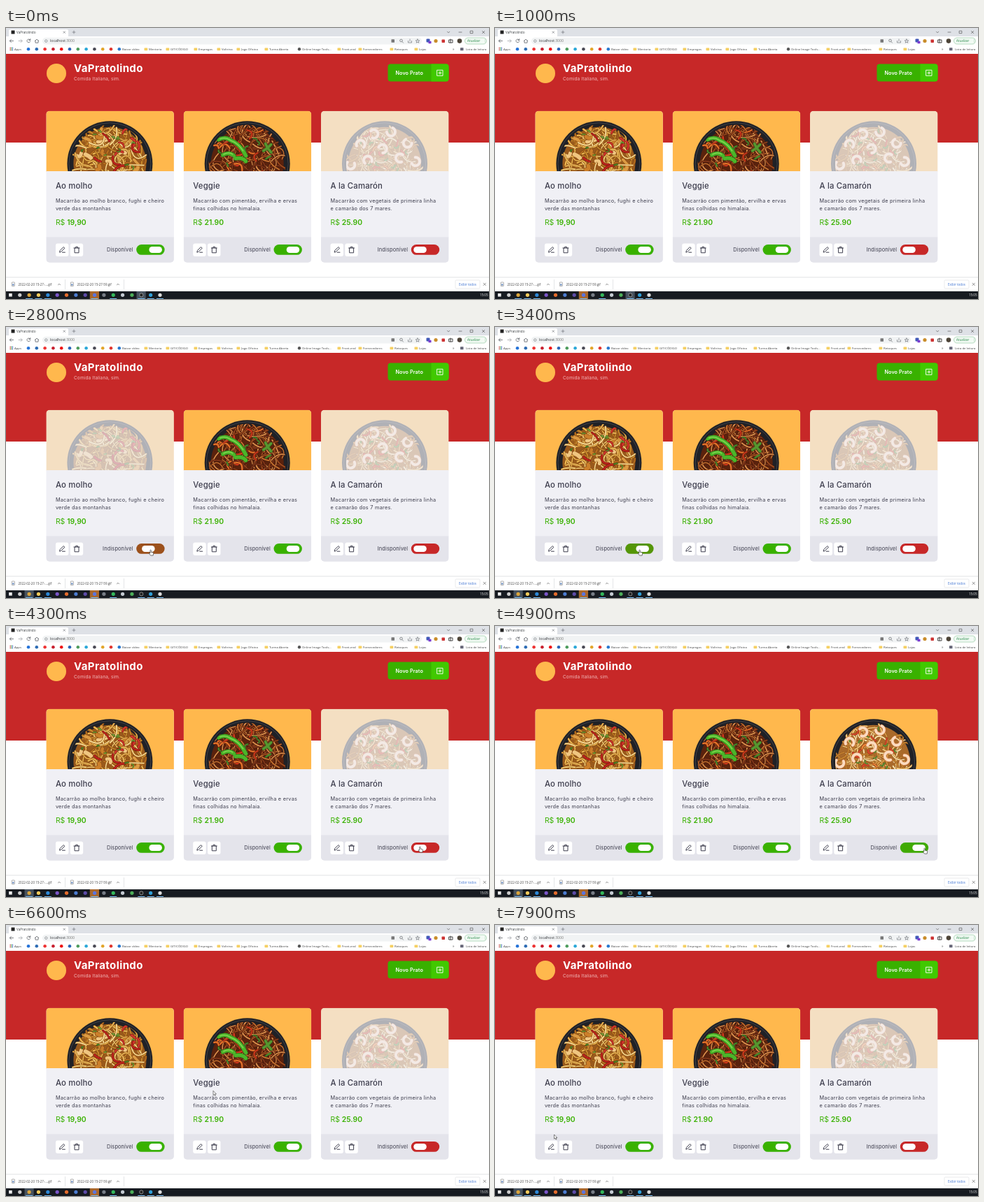
These frames come from a looping animation (690x388 px, 8000 ms). An HTML page:

```html
<!DOCTYPE html>
<html lang="pt-BR">
<head>
<meta charset="utf-8">
<title>VaPratolindo</title>
<style>
  html, body { margin: 0; width: 100%; height: 100%; overflow: hidden; background: #fff; }
  svg { display: block; width: 100%; height: 100%; font-family: Inter, "Open Sans", sans-serif; }
  .ui { font-family: "Open Sans", Roboto, sans-serif; }
</style>
</head>
<body>
<svg id="stage" viewBox="0 0 690 388"></svg>
<script>
const LOOP = 8000, STEP = 100;
const GREEN = [57, 177, 0], RED = [199, 40, 40];

// --- drawing helpers ---
const rect = (x, y, w, h, fill, r = 0, more = '') =>
  `<rect x="${x}" y="${y}" width="${w}" height="${h}" rx="${r}" fill="${fill}" ${more}/>`;
const dot = (x, y, r, fill, more = '') => `<circle cx="${x}" cy="${y}" r="${r}" fill="${fill}" ${more}/>`;
const line = (d, color, w = 1, more = '') =>
  `<path d="${d}" fill="none" stroke="${color}" stroke-width="${w}" stroke-linecap="round" stroke-linejoin="round" ${more}/>`;
const text = (x, y, size, fill, str, more = '') =>
  `<text x="${x}" y="${y}" font-size="${size}" fill="${fill}" ${more}>${str}</text>`;

// --- browser window ---
function browserTop() {
  const ink = '#5f6368';
  let s = rect(0, 0, 690, 12.5, '#dee1e6') + rect(4, 2, 85, 11, '#fff', 2) + rect(0, 12, 690, 25, '#fff');
  s += rect(7.5, 3.5, 5, 5, '#222') + text(15, 7.8, 4.6, '#3c4043', 'VaPratolindo');
  s += line('M82 4.8l2.6 2.6m0-2.6l-2.6 2.6M95 6h4m-2-2v4', ink, .6);
  s += line('M630.5 5.2l1.6 1.6l1.6-1.6M647 6h4M663.5 4.2h3.4v3.4h-3.4zM680.5 4.4l3.2 3.2m0-3.2l-3.2 3.2', '#444', .6);
  s += line('M10.5 18.5h-5m2-2.2l-2.2 2.2l2.2 2.2', ink, .8);
  s += line('M18 18.5h5m-2-2.2l2.2 2.2l-2.2 2.2', '#a5a8ac', .8);
  s += line('M34.5 17.2a2.4 2.4 0 1 0 .2 2M34.8 15.6v1.9h-1.9', ink, .8);
  s += line('M41.2 18.6l2.8-2.5l2.8 2.5m-4.8-.4v3h4v-3', ink, .8);
  s += rect(52, 13.8, 542, 9.6, '#f1f3f4', 4.8) + dot(57.3, 18.6, 1.7, 'none', `stroke="${ink}" stroke-width=".6"`);
  s += text(63, 20.4, 5.2, '#303236', 'localhost<tspan fill="#777">:3000</tspan>');
  s += rect(550.5, 16.3, 4.5, 4.5, '#777', .5);
  s += dot(564.5, 18, 1.8, 'none', `stroke="${ink}" stroke-width=".7"`) + line('M566 19.6l1.5 1.6', ink, .7);
  s += line('M574.5 18.5v2.5h5v-2.5m-2.5-2.5v3M588 16l.8 1.8l2 .1l-1.6 1.3l.6 2l-1.8-1.1l-1.8 1.1l.6-2l-1.6-1.3l2-.1z', ink, .6);
  s += rect(600.5, 15.5, 5, 5, '#4059b8', 1) + rect(603.5, 18.8, 4, 3.5, '#7a3bd0', .6);
  s += dot(614, 18.5, 2.6, '#c98d2b') + rect(622.5, 16.5, 4.5, 4.5, '#c33', .8);
  s += line('M635 16v5m-2-4h5v4h-5z', '#333', .9) + dot(648, 18.6, 3.3, '#4d4438');
  s += rect(655.5, 14, 31, 9, '#f2faf4', 4.5, 'stroke="#86c398" stroke-width=".6"');
  s += text(659, 20.1, 4.5, '#2b8a4b', 'Atualizar') + text(682, 20, 5, '#2b8a4b', '⋮');
  return s + bookmarks();
}

function bookmarks() {
  let s = '';
  for (let i = 0; i < 9; i++)
    s += rect(5.5 + i % 3 * 1.7, 27.8 + (i / 3 | 0) * 1.7, 1.2, 1.2, ['#d44', '#4a4', '#46c'][i % 3]);
  s += text(12, 31.8, 4.3, '#444', 'Apps');
  ['#2472d8', '#2d6cb4', '#e33', '#c8202f', '#e11', '#2a65b8', '#4d9c5d', '#2aa8d8', '#4a4a55', '#e2a52a', '#e0362e', '#2878d0']
    .forEach((c, i) => s += dot(32 + i * 11.8, 30.3, 2.3, c));
  const labels = [[166, 'Baixar vídeo'], [204, 'Mentoria', 1], [235, 'GIT/CÓDIGO', 1], [275, 'Empregos', 1],
    [308, 'Voltrina', 1], [336, 'Jogo Oficina', 1], [376, 'Turma Aberta', 1], [423, 'Online Image Tools...'],
    [480, 'Front-end', 1], [510, 'Fornecedores', 1], [555, 'Retoques', 1], [590, 'Lojas', 1]];
  for (const [x, str, folder] of labels) {
    if (folder) s += rect(x - 6.5, 28.4, 4.8, 3.8, '#f5cf62', .6);
    s += text(x, 31.8, 4.3, '#444', str);
  }
  s += dot(419, 30.3, 2.2, '#555');
  return s + text(638, 31.8, 5, '#555', '»') + rect(649, 28.3, 4.5, 4, '#667', .5) + text(657, 31.8, 4.3, '#444', 'Lista de leitura');
}

function bottomBars() {
  let s = rect(0, 357, 690, 20.5, '#fff') + rect(0, 356.6, 690, .7, '#d4d6d9');
  [[8, '2022-02-20 15-27-....gif', 76], [92, '2022-02-20 15-27-59.gif', 160]].forEach(([x, name, up]) => {
    s += rect(x + .3, 364, 4, 5.6, '#fff', .5, 'stroke="#777" stroke-width=".6"') + rect(x + 1.2, 366.5, 2.2, 2, '#5b82bd');
    s += text(x + 9.5, 368.9, 4.5, '#444', name);
    s += line(`M${up - 1.5} 367.8l1.5-1.5l1.5 1.5`, '#555', .7) + rect(up + 8, 360, .6, 14, '#d2d4d7');
  });
  s += rect(642, 361, 35, 12, '#fff', 1.5, 'stroke="#dadce0" stroke-width=".6"');
  s += text(659.5, 368.6, 4.5, '#3a70d0', 'Exibir todos', 'text-anchor="middle"');
  s += line('M682 365.2l3.4 3.4m0-3.4l-3.4 3.4', '#666', .7);
  s += rect(0, 377, 690, 11, '#171b21');
  s += rect(26.5, 377, 13.2, 11, '#46515d', 0, 'id="browserTask"') + rect(186.5, 377, 13.2, 11, '#46515d', 0, 'id="recorderTask"');
  s += rect(119.8, 377, 13.2, 11, '#a9672c');
  ['#eee', '#ccc', '#dba53a', '#f3cb5b', '#2c88d8', '#7a55c8', '#e36b2c', '#4c7cd0', '#5d4ba8', '#5b74df',
    '#777d86', '#33b85a', '#c5cbd3', '#4cae58', '#222', '#2f9fd8', '#ddd'].forEach((c, i) => {
    const x = 6.4 + i * 13.35;
    s += i ? dot(x, 382.3, 2.6, c, i === 14 ? 'stroke="#ccc" stroke-width=".6"' : '') : rect(x - 2.3, 380, 4.6, 4.6, c);
    if ([2, 3, 4, 9, 11, 14, 15, 16].includes(i)) s += rect(x - 5, 387, 10, 1, '#76b9ed');
  });
  return s + text(677, 384, 4.5, '#eee', '15:05');
}

// --- page ---
function header() {
  let s = rect(0, 37, 690, 127, '#c72828') + dot(72, 65, 14, '#ffb84d');
  s += text(97, 63.3, 15, '#fff', 'VaPratolindo', 'font-weight="700" letter-spacing=".4"');
  s += text(97, 75.2, 6.5, '#f0b9b9', 'Comida Italiana, sim.', 'letter-spacing=".12"');
  s += rect(545.5, 51.6, 87, 25, '#39b100', 4) + `<path d="M607.5 51.6h21a4 4 0 0 1 4 4v17a4 4 0 0 1-4 4h-21z" fill="#41c900"/>`;
  s += text(556.5, 66.8, 7.2, '#fff', 'Novo Prato', 'font-weight="600" letter-spacing=".1"');
  return s + line('M616 60.3h8v8h-8zM620 62.3v4m-2-2h4', '#fff', .9);
}

let seed = 7;
const random = () => (seed = seed * 16807 % 2147483647) / 2147483647;
const between = (a, b) => a + (b - a) * random();
const shaded = (d, color, shade, w) => line(d, shade, w + 1) + line(d, color, w);

// Scatters curved strands with dark edges over the pan.
function strew(count, colors, shade, width, length) {
  let s = '';
  for (let i = 0; i < count; i++) {
    const a = between(0, 6.283), r = 51 * Math.sqrt(random()), dir = between(0, 6.283), len = between(length / 2, length);
    const dx = Math.cos(dir) * len, dy = Math.sin(dir) * len, bend = between(-.9, .9);
    const x = 91 + r * Math.cos(a) - dx / 2, y = 74 + r * Math.sin(a) - dy / 2;
    const mid = [dx / 2 - dy * bend, dy / 2 + dx * bend].map(v => v.toFixed(1));
    s += shaded(`M${x.toFixed(1)} ${y.toFixed(1)}q${mid} ${dx.toFixed(1)} ${dy.toFixed(1)}`,
      colors[i % colors.length], shade, between(width * .6, width));
  }
  return s;
}

function shrimps() {
  const spots = [[56, 47], [76, 32], [101, 30], [124, 47], [112, 68], [66, 70], [88, 53], [136, 72], [43, 78]];
  return spots.map(([x, y], i) => `<g transform="translate(${x} ${y}) rotate(${i * 67})">` +
    shaded('M-5 3a6 6 0 1 1 10 2', '#fbdcc0', '#d77f4e', 3.8) + '</g>').join('');
}

const pods = () => shaded('M50 41q10-5 17 1q13 4 22 22M56 63q9-5 16 1M74 68q10-2 15 4', '#4cb529', '#256d17', 5) +
  line('M52 40q8-3 15 2q11 4 18 15M57 62q8-4 13 0', '#86d957', 1.3) +
  shaded('M117 47l3 6l5-5M120 53l-6 4m6-4l5 6', '#57962f', '#2a561a', 3.5);

const dishes = [
  { title: 'Ao molho', lines: ['Macarrão ao molho branco, fughi e cheiro', 'verde das montanhas'], price: '19,90',
    on: true, clicks: [2660, 3240], base: '#9a5a1c',
    food: () => strew(110, ['#c98a2c', '#eeb850', '#f3cb73', '#b8701f'], '#7a4212', 2.4, 28) +
      strew(16, ['#dd9b42', '#f0c680', '#cc7f2a'], '#8a4a14', 6, 13) + strew(30, ['#f9dd96', '#eab95a'], '#a0631f', 2, 28) +
      strew(12, ['#c0241b', '#d3362a'], '#6e1410', 2.8, 17) + strew(24, ['#4f8a26', '#7aab38'], '#3a5414', 1.5, 5) },
  { title: 'Veggie', lines: ['Macarrão com pimentão, ervilha e ervas', 'finas colhidas no himalaia.'], price: '21.90',
    on: true, clicks: [], base: '#5a220d',
    food: () => strew(140, ['#9c4a1e', '#c4702f', '#84381a', '#d98d4a'], '#42160a', 2, 32) +
      strew(18, ['#d23a1c', '#e5752a'], '#6b1c0c', 2.4, 15) + strew(10, ['#4b8a2a'], '#27481a', 2, 8) + pods() },
  { title: 'A la Camarón', lines: ['Macarrão com vegetais de primeira linha', 'e camarão dos 7 mares.'], price: '25.90',
    on: false, clicks: [4710, 5120], base: '#aa6a2a',
    food: () => strew(130, ['#dda04a', '#f3cb7c', '#f8dfa6', '#c5822f'], '#94571f', 2.2, 30) +
      strew(16, ['#d9472a', '#ee8a38'], '#8e3416', 2.4, 12) + strew(18, ['#6a9a38'], '#4a6a22', 1.4, 6) + shrimps() }
];

function card(dish, i) {
  const note = '#3d3d4d';
  let s = `<g transform="translate(${57.4 + i * 196.3} 118.8)" clip-path="url(#cardClip)">` + rect(0, 0, 182.5, 217, '#f0f0f5');
  s += `<g id="photo${i}">` + rect(0, 0, 182.5, 87, '#ffb84d') + dot(91, 75.5, 61, '#202126') +
    dot(91, 75.5, 58.5, 'none', 'stroke="#4a4b50" stroke-width=".8"') +
    `<g clip-path="url(#panClip)">${dot(91, 75, 52, dish.base) + dish.food()}</g></g>`;
  s += rect(0, 86.2, 182.5, 95, '#f0f0f5') + rect(0, 180.6, 182.5, 37, '#e4e4eb');
  s += text(13.5, 111.7, 11.3, note, dish.title, 'font-weight="500" letter-spacing=".2"');
  dish.lines.forEach((str, k) => s += text(13.5, 131.3 + k * 10.7, 7.3, note, str, 'letter-spacing=".26"'));
  s += text(13.5, 163.2, 10.4, '#39b100', `R$ <tspan font-weight="600">${dish.price}</tspan>`);
  s += rect(13.5, 189.7, 18.5, 18.5, '#fff', 3) + rect(34.3, 189.7, 18.5, 18.5, '#fff', 3);
  s += line('M19.2 202l.6-2.3l5-5l1.7 1.7l-5 5zM23 202.4h4', note, 1);
  s += line('M39.6 196.2h8m-5.4 0v-1.6h2.8v1.6m-4.4 0v6.8h6v-6.8', note, 1);
  s += text(124.2, 201.4, 7.4, note, '', `id="label${i}" text-anchor="end" letter-spacing=".14"`);
  s += rect(128.8, 191.2, 40.4, 14.8, '', 7.4, `id="track${i}"`) + rect(0, 194.2, 18.5, 9, '#fff', 4.5, `id="knob${i}"`);
  return s + '</g>';
}

const $ = id => document.getElementById(id);
$('stage').innerHTML =
  '<defs><clipPath id="cardClip"><rect width="182.5" height="217" rx="5"/></clipPath><clipPath id="panClip"><circle cx="91" cy="75" r="55"/></clipPath></defs>' +
  rect(0, 0, 690, 388, '#fff') + header() + dishes.map(card).join('') +
  `<g class="ui">${browserTop() + bottomBars()}</g>` +
  '<g id="pointer"><path id="arrow" d="M0 0v6.2l1.4-1.2l1 2.2l1.1-.5l-1-2.1h1.9z" fill="#fff" stroke="#333" stroke-width=".6"/>' +
  '<path id="hand" d="M-.6.6q.7-1 1.4 0v2.6l2.8.6q.8.3.6 1.3l-.5 3h-3.6l-2.4-3q.2-1 1.7 0z" fill="#fff" stroke="#222" stroke-width=".6"/></g>';

// --- motion ---
const path = [[1400, -8, 230], [2000, 200.5, 279.5], [2500, 206.5, 319], [3500, 206.5, 319], [3900, 400, 298],
  [4400, 613.5, 318], [5200, 613.5, 318], [5500, 541, 291], [6400, 331, 240], [7200, 107, 223], [7900, 84.5, 300]];

function pointerAt(t) {
  const k = path.findIndex(p => p[0] > t);
  if (k <= 0) return (k ? path[path.length - 1] : path[0]).slice(1);
  const [t0, x0, y0] = path[k - 1], [t1, x1, y1] = path[k], u = (t - t0) / (t1 - t0);
  const e = u * u * (3 - 2 * u);
  return [x0 + (x1 - x0) * e, y0 + (y1 - y0) * e];
}

function draw(t) {
  dishes.forEach((dish, i) => {
    const done = dish.clicks.filter(c => c <= t);
    const on = dish.on !== (done.length % 2 === 1);
    const u = done.length ? Math.min(1, (t - done[done.length - 1]) / 200) : 1;
    const green = on ? u : 1 - u;
    $('photo' + i).setAttribute('opacity', on ? 1 : .3);
    $('label' + i).textContent = on ? 'Disponível' : 'Indisponível';
    $('knob' + i).setAttribute('x', 132.3 + 14.7 * green);
    $('track' + i).setAttribute('fill', `rgb(${RED.map((c, k) => Math.round(c + (GREEN[k] - c) * green))})`);
  });
  const [x, y] = pointerAt(t);
  const over = y > 310 && y < 325 && dishes.some((_, i) => Math.abs(x - 206.5 - i * 196.3) < 20);
  $('pointer').setAttribute('transform', `translate(${x} ${y})`);
  $('arrow').setAttribute('opacity', over ? 0 : 1);
  $('hand').setAttribute('opacity', over ? 1 : 0);
  $('browserTask').setAttribute('opacity', t >= 2600 ? 1 : 0);
  $('recorderTask').setAttribute('opacity', t >= 2600 ? 0 : 1);
}

const start = performance.now();
function tick() {
  const t = (performance.now() - start) % LOOP;
  draw(Math.floor(t / STEP) * STEP);
  requestAnimationFrame(tick);
}
tick();
</script>
</body>
</html>
```
